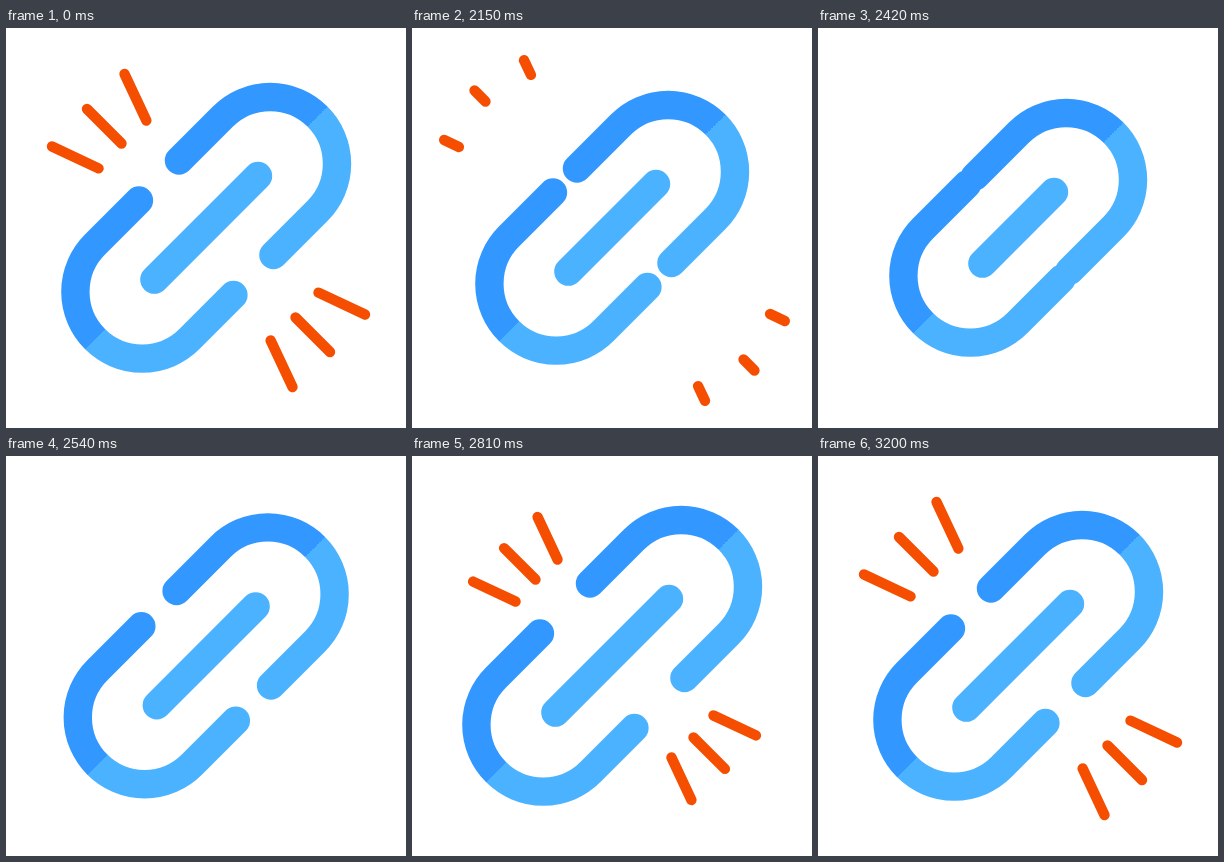
Write an HTML page that moves like this. It is 400 px wide and 400 px high and loops after 3230 ms.

```html
<!DOCTYPE html>
<html lang="en">
<head>
<meta charset="utf-8">
<title>Link breaking</title>
<style>
  html, body { margin: 0; width: 100%; height: 100%; overflow: hidden; background: #fff; }
  svg { display: block; width: 100%; height: 100%; }
</style>
</head>
<body>
<svg viewBox="0 0 400 400" fill="none" stroke-linecap="round">
  <defs>
    <linearGradient id="tone" gradientUnits="userSpaceOnUse" x1="0" y1="-100" x2="0" y2="100">
      <stop offset=".5" stop-color="#3297ff"/>
      <stop offset=".5" stop-color="#4bb2ff"/>
    </linearGradient>
  </defs>
  <g transform="translate(200.2 199.8) rotate(-45)" stroke-width="28.4">
    <path class="half" stroke="url(#tone)"/>
    <path class="half" stroke="url(#tone)" transform="scale(-1 1)"/>
    <path id="bar" stroke="#4bb2ff"/>
  </g>
  <g stroke="#f54e00" stroke-width="10.4">
    <path class="sparks"/>
    <path class="sparks" transform="rotate(180 202.5 202.5)"/>
  </g>
</svg>
<script>
const LOOP = 3230, HOLD = 2030, STEP = 30;
const RADIUS = 66.8;
const halves = document.querySelectorAll('.half');
const sparks = document.querySelectorAll('.sparks');
const bar = document.getElementById('bar');

const span = (k, a, b) => Math.min(1, Math.max(0, (k - a) / (b - a)));
const mix = (a, b, t) => a + (b - a) * t;
const smooth = t => t * t * (3 - 2 * t);
const easeOut = (t, power) => 1 - Math.pow(1 - t, power);

// x positions along each ray: birth, resting inner and outer ends, vanishing point
const SIDE = { birth: 123.5, inner: 92.5, outer: 46, gone: 25.8 };
const MIDDLE = { birth: 138, inner: 115.5, outer: 81, gone: 54 };
const sideY = x => 118.5 + 0.47 * (x - 46);

// Diagonal offset of the rounded ends from the centre
function spread(k) {
  if (k < 15) return mix(64, 48, smooth(span(k, 0, 10)));
  if (k < 32) return mix(48, 69, smooth(span(k, 15, 20)));
  return mix(69, 64, smooth(span(k, 32, 40)));
}

function ends(ray, k) {
  if (k < 8) {
    const t = smooth(span(k, 0, 8));
    return [mix(ray.outer, ray.gone, t), mix(ray.inner, ray.gone, t)];
  }
  const t = span(k, 20, 40);
  return [mix(ray.birth, ray.outer, easeOut(t, 3.8)), mix(ray.birth, ray.inner, easeOut(t, 2.4))];
}

function sparkPath(k) {
  if (k >= 8 && k <= 20) return '';
  const [a, b] = ends(SIDE, k), [m, n] = ends(MIDDLE, k);
  const ya = sideY(a), yb = sideY(b);
  return `M${a} ${ya}L${b} ${yb}M${m} ${m}L${n} ${n}M${ya} ${a}L${yb} ${b}`;
}

function draw(time) {
  const t = time % LOOP;
  const k = t < HOLD ? 0 : Math.floor((t - HOLD) / STEP) + 1;
  const d = spread(k);
  const arc = d * Math.SQRT2, tip = (d - 44) * Math.SQRT2, reach = (d - 12.2) * Math.SQRT2;
  const half = `M${tip} ${-RADIUS}H${arc}A${RADIUS} ${RADIUS} 0 0 1 ${arc} ${RADIUS}H${tip}`;
  halves.forEach(p => p.setAttribute('d', half));
  bar.setAttribute('d', `M${-reach} 0H${reach}`);
  const rays = sparkPath(k);
  sparks.forEach(p => p.setAttribute('d', rays));
}

const start = performance.now();
function tick() {
  draw(performance.now() - start);
  requestAnimationFrame(tick);
}
tick();
</script>
</body>
</html>
```
